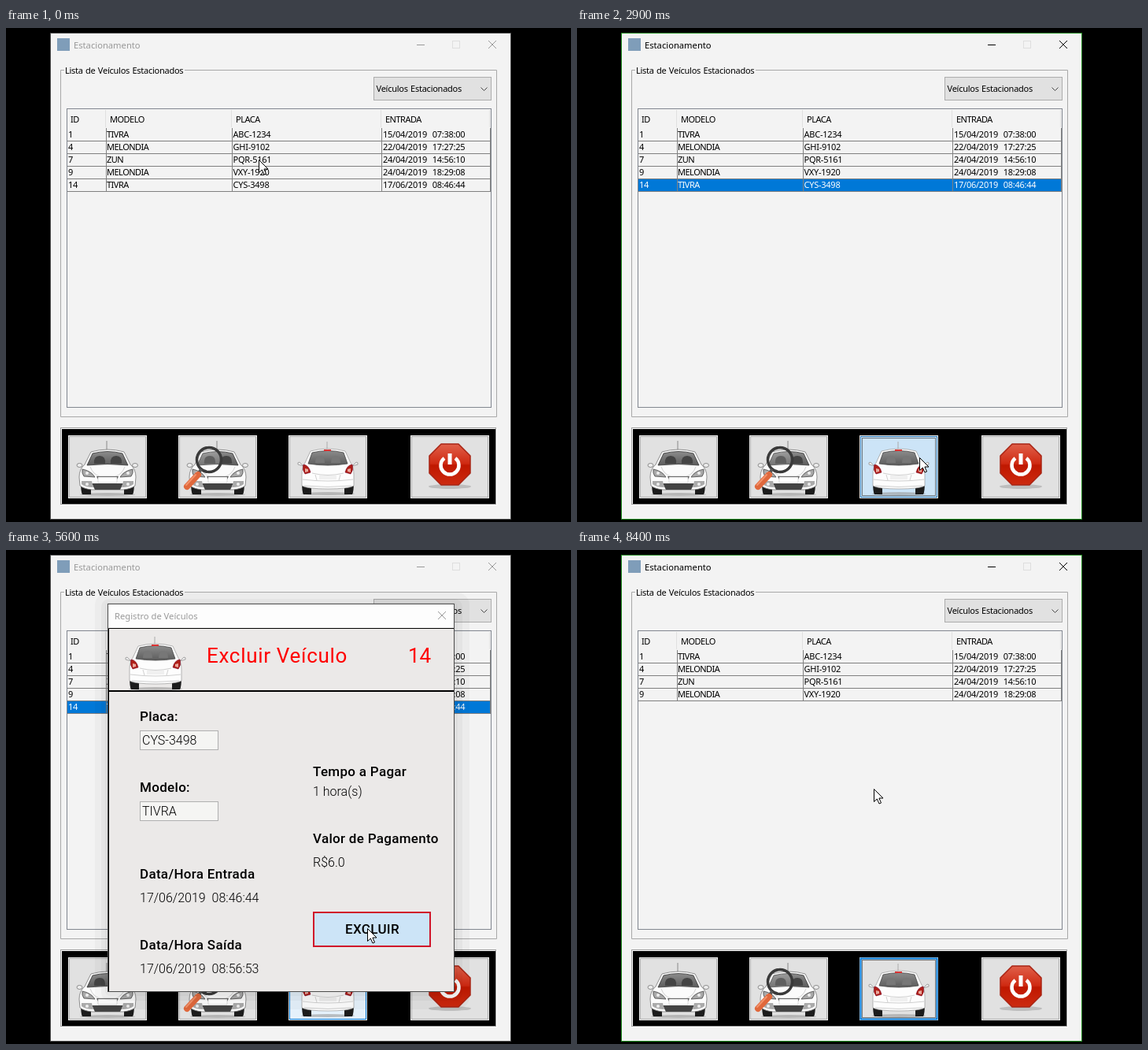
An HTML page for the animation above (8500 ms loop, 718 by 627 pixels).

```html
<!DOCTYPE html>
<html lang="pt-BR">
<head>
<meta charset="utf-8">
<title>Estacionamento</title>
<style>
  html, body { margin: 0; width: 100%; height: 100%; overflow: hidden; background: #000; }
  svg { display: block; }
  text { white-space: pre; fill: #000; }
  .ui { font: 11px "Noto Sans", "Open Sans", sans-serif; letter-spacing: -.25px; word-spacing: .7px; }
  .caps { letter-spacing: -.5px; }
  .win { font: 11.2px "Noto Sans", "Open Sans", sans-serif; }
  .label { font: 500 17px Roboto, sans-serif; letter-spacing: .3px; }
  .value { font: 300 16px Roboto, sans-serif; }
  .head { font: 400 26px Roboto, sans-serif; letter-spacing: .7px; fill: #f00; }
  .line { fill: none; stroke: #808080; }
  .glyph { fill: none; stroke: #000; }

  .frame { stroke: #1d8a1d; }
  .off > .frame { stroke: #4c4c4c; }
  .off > .title { fill: #999; }
  .off > .glyph { stroke: #999; }
  .off > .shade { opacity: .6; }

  .rim { fill: none; stroke: #f0f0f0; }
  .face { fill: #e1e1e1; stroke: #adadad; }
  .dots { fill: none; stroke: none; }
  .warm > .face { fill: #e1e4e7; stroke: #5a9fd6; }
  .hover > .face { fill: #e5f1fb; stroke: #0078d7; }
  .press > .face { fill: #cce4f7; stroke: #2b78b5; }
  .default > .face { stroke: #0078d7; stroke-width: 2; }
  .fade > .face { fill: #e3e9ee; }
  .press > .dots, .default > .dots { stroke: #111; stroke-dasharray: 1 1; }

  .bar, .cell { display: none; }
  .sel .bar { display: inline; fill: #0078d7; }
  .sel text { fill: #fff; }
  .focus .cell { display: inline; fill: none; stroke: #f08a24; stroke-dasharray: 1 1; }
  .gone { display: none; }

  #dialog { transform-origin: 350px 314px; }
  #message { transform-origin: 349px 315px; }
  .field { fill: #f5f5f3; stroke: #b0b0b0; }
  .shade rect { fill: #000; fill-opacity: .05; }
</style>
</head>
<body>
<svg width="718" height="627" viewBox="0 0 718 627">
  <defs>
    <linearGradient id="glass" x2="0" y2="1"><stop stop-color="#8c8c8c"/><stop offset="1" stop-color="#5c5c5c"/></linearGradient>
    <linearGradient id="red" x2="0" y2="1"><stop stop-color="#e0604a"/><stop offset=".48" stop-color="#cf2a12"/><stop offset=".52" stop-color="#c01800"/><stop offset="1" stop-color="#cc2a10"/></linearGradient>
    <radialGradient id="blue" cy=".3"><stop stop-color="#5c8fe8"/><stop offset="1" stop-color="#123c9c"/></radialGradient>

    <g id="front" stroke-linejoin="round">
      <path d="M49 7V19" stroke="#888"/>
      <ellipse cx="50" cy="75" rx="35" ry="2" fill="#999" opacity=".6"/>
      <path d="M16 58H29V75H18Q16 72 16 58M71 58H84Q84 72 82 75H71Z" fill="#1c1c1c"/>
      <path d="M29 21Q50 15 71 21L79 37Q86 43 86 53L85 64Q80 68 70 69H30Q20 68 15 64L14 53Q14 43 21 37Z" fill="#fbfbfb" stroke="#777" stroke-width=".8"/>
      <path d="M31 23Q50 18 69 23L76 38Q50 35 24 38Z" fill="url(#glass)" stroke="#333" stroke-width=".8"/>
      <path d="M33 36q-1-10 7-10t7 10zM54 36q-1-10 7-10t7 10z" fill="#444"/>
      <ellipse cx="14.500" cy="38" rx="3.500" ry="2.500" fill="#eee" stroke="#666" stroke-width=".7"/>
      <ellipse cx="85" cy="38" rx="3.500" ry="2.500" fill="#eee" stroke="#666" stroke-width=".7"/>
      <path d="M28 40Q32 50 40 52H60Q68 50 72 40" fill="none" stroke="#c4c4c4" stroke-width=".8"/>
      <path d="M18 43Q29 45 34 53L20 52Q17 48 18 43ZM82 43Q71 45 66 53L80 52Q83 48 82 43Z" fill="#aaa" stroke="#444" stroke-width=".8"/>
      <circle cx="24" cy="48" r="2" fill="#eee"/><circle cx="76" cy="48" r="2" fill="#eee"/>
      <path d="M36 52H64L62 56H38Z" fill="#555"/>
      <path d="M30 61H70L66 69H34Z" fill="#444"/>
      <path d="M17 58H30L32 66Q22 66 17 62ZM83 58H70L68 66Q78 66 83 62Z" fill="#aaa"/>
      <rect x="38" y="53" width="24" height="7" fill="#fff" stroke="#bbb" stroke-width=".5"/>
      <circle cx="24" cy="62" r="2" fill="#eee"/><circle cx="76" cy="62" r="2" fill="#eee"/>
    </g>

    <g id="rear" stroke-linejoin="round">
      <path d="M49 8V19" stroke="#aaa"/>
      <ellipse cx="50" cy="74" rx="34" ry="2" fill="#999" opacity=".6"/>
      <path d="M17 58H29V75H19Q17 72 17 58M71 58H83Q83 72 81 75H71Z" fill="#1c1c1c"/>
      <path d="M28 20Q50 14 72 20L79 35Q83 40 83 50V64Q76 68 50 68Q24 68 17 64V50Q17 40 21 35Z" fill="#fdfdfd" stroke="#999" stroke-width=".7"/>
      <path d="M30 22Q50 17 70 22L75 36Q50 40 25 36Z" fill="url(#glass)" stroke="#444" stroke-width=".8"/>
      <path d="M34 35q0-9 6-9t6 9zM54 35q0-9 6-9t6 9z" fill="#777"/>
      <rect x="45" y="18" width="9" height="2" fill="#d33"/>
      <path d="M14 34q-3 0-2 3l7 2zM86 34q3 0 2 3l-7 2z" fill="#eee" stroke="#777" stroke-width=".6"/>
      <path d="M19 37Q26 38 28 47L21 49Q17 44 19 37ZM81 37Q74 38 72 47L79 49Q83 44 81 37Z" fill="#b02018" stroke="#702" stroke-width=".6"/>
      <path d="M21 42l4 1v3l-4 1zM79 42l-4 1v3l4 1z" fill="#e9a79d"/>
      <path d="M30 48Q50 53 70 48M18 56Q50 60 82 56M34 50L36 57M66 50L64 57M20 64Q50 67 80 64" fill="none" stroke="#c4c4c4" stroke-width=".8"/>
      <rect x="39" y="51" width="22" height="5" fill="#f0f0f0"/>
    </g>

    <g id="lens">
      <circle cx="39" cy="31" r="15.500" fill="#fff" fill-opacity=".15" stroke="#3a3a3a" stroke-width="3.500"/>
      <path d="M29 43L25 49" stroke="#555" stroke-width="4"/>
      <path d="M25 50L11 65" stroke="#e0683c" stroke-width="8" stroke-linecap="round"/>
      <path d="M22 50L10 63" stroke="#f2926a" stroke-width="2" stroke-linecap="round"/>
    </g>

    <g id="power">
      <ellipse cx="50" cy="65" rx="27" ry="3" fill="#999" opacity=".5"/>
      <path d="M39 11H61L76 26V48L61 63H39L24 48V26Z" fill="url(#red)" stroke="#a82414" stroke-width="1.500" stroke-linejoin="round"/>
      <path d="M43 29A11.500 11.500 0 1 0 57 29" fill="none" stroke="#fff" stroke-width="4.500"/>
      <path d="M50 23V37" stroke="#fff" stroke-width="5"/>
    </g>
  </defs>

  <g id="main">
    <rect class="frame" x="56.5" y="6.5" width="585" height="617" fill="#f3f3f3"/>
    <rect x="65" y="13" width="16" height="16" fill="#7f9db9"/>
    <text class="win title" x="86" y="26">Estacionamento</text>
    <path class="glyph" d="M522 21.5H532M613 16L623 26M623 16L613 26"/>
    <rect x="567.5" y="16.5" width="9" height="9" fill="none" stroke="#dedede"/>

    <path d="M74 53.5H69.5V493.5H623.5V53.5H227" fill="none" stroke="#a8a8a8"/>
    <text class="ui" x="75" y="58">Lista de Veículos Estacionados</text>
    <rect x="467.5" y="62.5" width="149" height="29" fill="#e1e1e1" stroke="#adadad"/>
    <text class="ui" x="470.5" y="81">Veículos Estacionados</text>
    <path d="M603.5 75.5L607.5 79.5L611.5 75.5" fill="none" stroke="#444"/>

    <rect x="77.5" y="102.5" width="539" height="379" fill="none" stroke="#828790"/>
    <path d="M126.5 104V126M286.5 104V126M476.5 104V126M614.5 104V126" stroke="#e0e0e0"/>
    <g id="table"></g>

    <rect x="70.5" y="508.5" width="553" height="97" fill="#000" stroke="#fff"/>
    <rect x="69.5" y="507.5" width="553" height="97" fill="none" stroke="#a0a0a0"/>
    <g id="tools"></g>
  </g>

  <g id="dialog">
    <g class="shade"><rect x="113" y="54" width="476" height="529" rx="16"/><rect x="121" y="62" width="459" height="510" rx="10"/><rect x="126" y="66" width="448" height="500" rx="6"/></g>
    <rect class="frame" x="129.5" y="68.5" width="440" height="492" fill="#fdfdfd"/>
    <rect x="130" y="99" width="439" height="461" fill="#ebe9e8"/>
    <path d="M130.5 560V99.5H569" fill="none" stroke="#000"/>
    <path d="M130 179H569" stroke="#000" stroke-width="2"/>
    <text class="win title" x="138" y="88">Registro de Veículos</text>
    <path class="glyph" d="M549 78L559 88M559 78L549 88"/>
    <use href="#rear" x="140" y="102"/>
    <text class="head" x="255" y="143">Excluir Veículo</text>
    <text class="head" x="511" y="143" style="letter-spacing:0">14</text>
    <rect class="field" x="170.5" y="229.5" width="99" height="24"/>
    <rect class="field" x="170.5" y="319.5" width="99" height="24"/>
    <g id="form"></g>
    <path id="caret" d="M243.5 232V251" stroke="#000"/>
    <rect id="remove" x="391" y="460" width="148" height="43" stroke="#d0142a" stroke-width="2"/>
    <text class="label" x="431" y="487">EXCLUIR</text>
  </g>

  <g id="message">
    <g class="shade"><rect x="105" y="240" width="492" height="153" rx="16"/><rect x="113" y="248" width="474" height="137" rx="10"/><rect x="118" y="252" width="463" height="128" rx="6"/></g>
    <rect class="frame" x="121.5" y="254.5" width="455" height="121" fill="#f2f2f2"/>
    <rect x="122" y="255" width="454" height="30" fill="#fdfdfd"/>
    <text class="win" x="130" y="274">Excluir veículo</text>
    <path class="glyph" d="M556 264L566 274M566 264L556 274"/>
    <circle cx="148" cy="311" r="15" fill="url(#blue)" stroke="#c4cad4" stroke-width="1.5"/>
    <text x="148" y="319.5" text-anchor="middle" style="font:bold 24px 'Noto Serif',serif;fill:#fff">?</text>
    <text class="win" x="179" y="316">Tem certeza que deseja excluir o veículo com placa de número CYS-3498 ?</text>
    <g class="default">
      <rect class="face" x="273" y="339" width="71" height="21"/>
      <rect class="dots" x="274.5" y="340.5" width="68" height="18"/>
    </g>
    <rect class="face" x="353.5" y="338.5" width="72" height="22"/>
    <text class="win" x="309" y="354" text-anchor="middle">Sim</text>
    <text class="win" x="389" y="354" text-anchor="middle">Não</text>
  </g>

  <path id="cursor" d="M.5 .5V16.5L4.3 13L7 19L9.5 18L6.9 12H12Z" fill="#fff" stroke="#000"/>
</svg>
<script>
const LOOP = 8500, STEP = 100;
const $ = id => document.getElementById(id);
const text = (cls, x, y, s) => `<text class="${cls}" x="${x}" y="${y}">${s}</text>`;

// Table
const header = [[82, 'ID'], [132, 'MODELO'], [292, 'PLACA'], [482, 'ENTRADA']];
const cols = [79, 128, 288.5, 479];
const rows = [
  [1, 'TIVRA', 'ABC-1234', '15/04/2019  07:38:00'],
  [4, 'MELONDIA', 'GHI-9102', '22/04/2019  17:27:25'],
  [7, 'ZUN', 'PQR-5161', '24/04/2019  14:56:10'],
  [9, 'MELONDIA', 'VXY-1920', '24/04/2019  18:29:08'],
  [14, 'TIVRA', 'CYS-3498', '17/06/2019  08:46:44']
];
$('table').innerHTML =
  header.map(([x, s]) => text('ui caps', x, 120, s)).join('') +
  rows.map((row, r) => {
    const y = 127 + r * 16;
    return `<g id="row${r}"><rect class="bar" x="78" y="${y + 1}" width="538" height="15"/>
      <path class="line" d="M78 ${y + 16.5}H616M127.5 ${y}v16M287.5 ${y}v16M477.5 ${y}v16M615.5 ${y}v16"/>
      <rect class="cell" x="477.5" y="${y + 1.5}" width="137" height="14"/>
      ${row.map((s, i) => text(i === 1 ? 'ui caps' : 'ui', cols[i], y + 12, s)).join('')}</g>`;
  }).join('');

// Toolbar
const tools = [['enter', 79, ['front']], ['search', 219, ['front', 'lens']], ['leave', 359, ['rear']], ['quit', 514, ['power']]];
$('tools').innerHTML = tools.map(([id, x, art]) =>
  `<g id="${id}" transform="translate(${x} 517)">
    <rect class="rim" x=".5" y=".5" width="99" height="79"/>
    <rect class="face" x="1.5" y="1.5" width="97" height="77"/>
    <rect class="dots" x="3.5" y="3.5" width="93" height="73"/>
    ${art.map(a => `<use href="#${a}"/>`).join('')}</g>`).join('');

// Form
const [, model, plate, entry] = rows[4];
const form = [
  ['label', 170, 217, 'Placa:'], ['value', 173, 247, plate],
  ['label', 170, 307, 'Modelo:'], ['value', 173, 337, model],
  ['label', 170, 417, 'Data/Hora Entrada'], ['value', 170, 447, entry],
  ['label', 170, 507, 'Data/Hora Saída'], ['value', 170, 537, '17/06/2019  08:56:53'],
  ['label', 390, 287, 'Tempo a Pagar'], ['value', 390, 312, '1 hora(s)'],
  ['label', 390, 372, 'Valor de Pagamento'], ['value', 390, 402, 'R$6.0']
];
$('form').innerHTML = form.map(f => text(...f)).join('');

// Motion: each track holds its value until the next time
const pop = (opacity, scale) => `opacity:${opacity};transform:scale(${scale})`;
const hide = 'display:none', show = pop(1, 1);

// One cursor position per step, from a start time
const path = (start, points) => Object.fromEntries(
  points.map(([x, y], i) => [start + i * STEP, `translate(${x} ${y})`]));

const tracks = [
  ['main', 'class', { 0: 'off', 600: 'on', 3100: 'off', 7200: 'on' }],
  ['row4', 'class', { 0: '', 600: 'sel focus', 2700: 'sel', 7200: 'gone' }],
  ['quit', 'class', { 0: '', 1600: 'warm', 1800: '' }],
  ['leave', 'class', { 0: '', 1800: 'warm', 1900: '', 2600: 'hover', 2700: 'press',
    3100: 'hover', 7200: 'default hover', 7500: 'default fade', 8300: 'default' }],
  ['dialog', 'style', { 0: hide, 3100: pop(.3, .94), 3200: pop(.7, .98), 3300: pop(.93, 1), 3400: show,
    7200: pop(.4, .96), 7300: hide }],
  ['dialog', 'class', { 0: 'on', 5600: 'off', 6700: 'on' }],
  ['caret', 'opacity', { 0: 0, 3400: 1, 3600: 0, 4200: 1, 4800: 0 }],
  ['remove', 'fill', { 0: '#ebe9e8', 4900: '#e5f1fb', 5200: '#cce4f7', 5900: '#d4e8f8', 6200: '#dcecf9', 6500: '#e5f1fb' }],
  ['message', 'style', { 0: hide, 5800: pop(.3, .94), 5900: pop(.7, .98), 6000: show, 6700: pop(.4, .97), 6800: hide }],
  ['cursor', 'transform', {
    ...path(0, [[321, 167], [200, 52], [83, 300], [335, 542], [564, 206]]),
    ...path(1300, [[561, 240], [557, 320], [553, 410], [548, 495], [544, 539], [430, 530], [327, 500]]),
    ...path(2300, [[243, 450], [270, 470], [350, 505], [435, 545]]),
    ...path(4500, [[437, 540], [442, 526], [449, 508], [456, 490], [459, 480]]),
    ...path(7500, [[490, 400], [514, 260], [440, 130], [290, 112], [150, 150], [133, 230], [250, 320], [390, 340], [460, 320], [377, 303]])
  }]
].map(([id, attr, keys]) => ({ el: $(id), attr, keys: Object.entries(keys) }));

function draw(now) {
  const t = now % LOOP;
  for (const { el, attr, keys } of tracks) {
    const value = String(keys.findLast(([time]) => time <= t)[1]);
    if (el.getAttribute(attr) !== value) el.setAttribute(attr, value);
  }
}

const start = performance.now();
function tick() {
  draw(performance.now() - start);
  requestAnimationFrame(tick);
}
tick();
</script>
</body>
</html>
```
